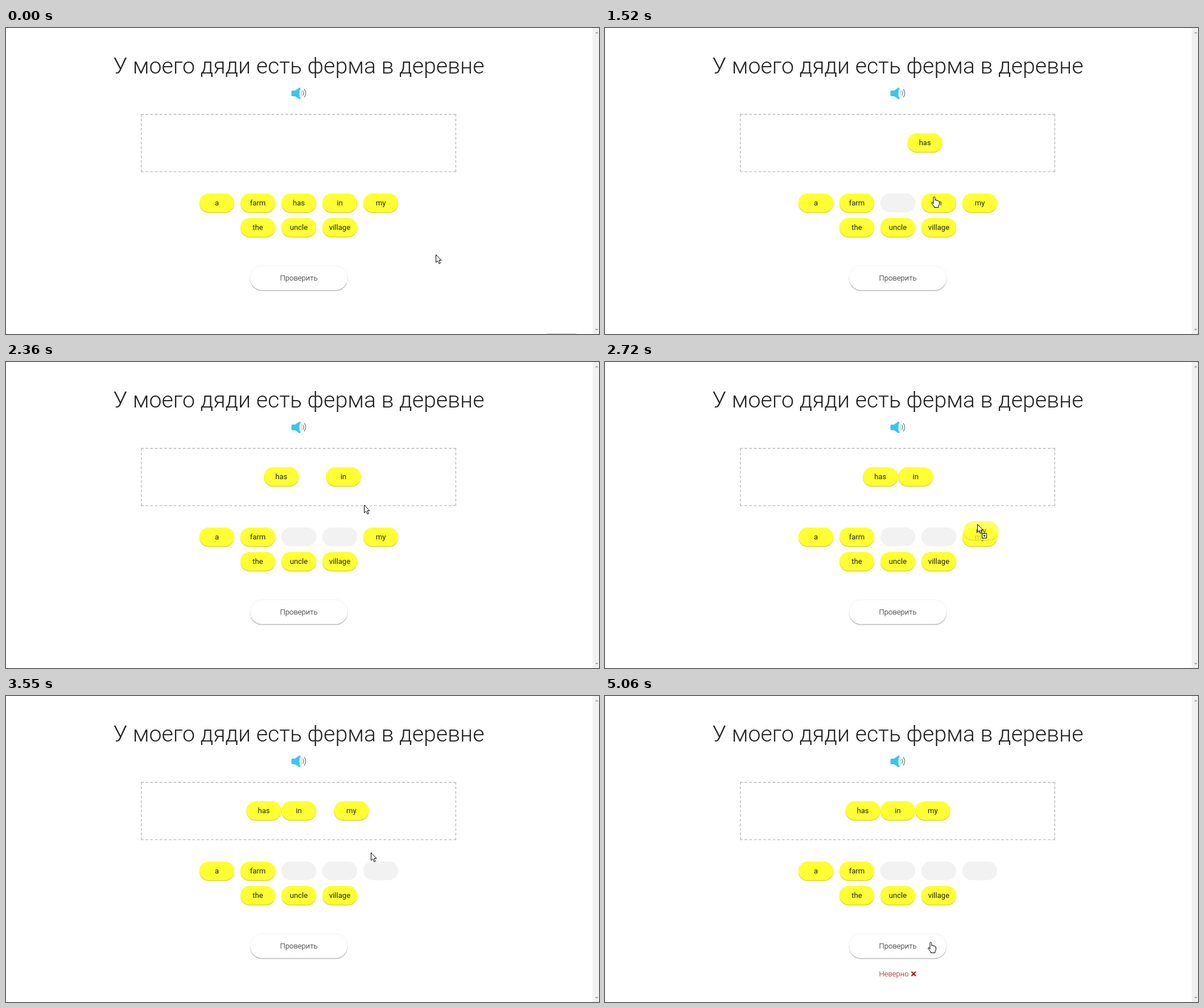
An HTML page for the animation above (6.33 s loop, 1042x538 px).

```html
<!DOCTYPE html>
<html lang="ru">
<head>
<meta charset="utf-8">
<title>Sentence builder</title>
<style>
  html, body { margin: 0; width: 100%; height: 100%; overflow: hidden; background: #fff; }
  svg { display: block; position: relative; }
  text { font: 13.1px Roboto, sans-serif; text-anchor: middle; fill: #212121; }
  .light { font-weight: 300; fill: #111; }
  .title { font-size: 39.3px; fill: #212121; }
  .outline { fill: #fff; stroke: #000; stroke-linejoin: round; }
  #zone {
    position: absolute; left: 237.400px; top: 150.800px; width: 677px; height: 125px;
    box-sizing: border-box; border: 2px dashed #c4c4c4;
    transform: scale(.8185); transform-origin: 0 0;
  }
</style>
</head>
<body>
<div id="zone"></div>
<svg width="1042" height="538" viewBox="0 0 1042 538">
  <text class="light title" x="514.5" y="80">У моего дяди есть ферма в деревне</text>

  <g fill="none" stroke="#8a8a8a" stroke-width="1.4">
    <path d="M503.500 110H508L516 104.500Q519.500 108 519.500 115T516 125.500L508 120H503.500Q501.500 120 501.500 118V112Q501.500 110 503.500 110Z" fill="#3bc4ef" stroke="none"/>
    <ellipse cx="517.200" cy="115" rx="1.600" ry="7.500" fill="#fff" stroke="none"/>
    <path d="M521.500 110.500Q524.500 114.800 521.500 119M524 107.500Q529.500 114.800 524 122"/>
  </g>

  <g id="board"></g>

  <rect id="buttonShadow" x="428.500" y="420" width="172" height="42.500" rx="21.200" fill="#c3c3c3"/>
  <rect x="428.800" y="418" width="171.400" height="42.500" rx="21.200" fill="#fff" stroke="#efefef" stroke-width=".8"/>
  <text class="light" x="514.500" y="444">Проверить</text>

  <g id="verdict">
    <text class="light" x="507.500" y="493" style="fill:#8e1010">Неверно</text>
    <path d="M538.500 484.700L546 492.200M546 484.700L538.500 492.200" stroke="#b01217" stroke-width="2.300"/>
  </g>

  <path id="dots" d="M951 537.500H1002" stroke="#888" stroke-dasharray="1 1"/>
  <rect x="1031" width="11" height="538" fill="#f1f1f1"/>
  <path d="M1035 9.500L1038 6.500 1041 9.500ZM1035 529L1038 532 1041 529Z" fill="#a3a3a3"/>

  <g id="drag"></g>
  <g id="cursor">
    <path id="arrow" class="outline" d="M.5 .5V14.200L3.700 11.300 6 16.500 8.200 15.500 6 10.500H10Z"/>
    <path id="hand" class="outline" d="M-2 12V1.500Q-2 0 -.5 0T1 1.500V6Q1.500 5 3 5.400T4 7Q5 6 6.300 6.600T7 8Q8 7.300 8.500 9V13L7 16V18.500H-.5V17L-5 11.500Q-5.500 9 -3.500 9.500Z"/>
    <g id="plus">
      <rect class="outline" x="8.500" y="16.500" width="8" height="8"/>
      <path d="M12.500 18.500V22.500M10.500 20.500H14.500" stroke="#000"/>
    </g>
  </g>
</svg>
<script>
const LOOP = 6330, STEP = 60, CHIP_W = 61.4, CHIP_H = 32.7, CENTER = 514.5;
const $ = id => document.getElementById(id);
const clamp = v => Math.max(0, Math.min(1, v));

function add(parent, tag, attrs) {
  const node = document.createElementNS('http://www.w3.org/2000/svg', tag);
  for (const name in attrs) node.setAttribute(name, attrs[name]);
  return parent.appendChild(node);
}
const place = (node, x, y) => node.setAttribute('transform', `translate(${x} ${y})`);
const show = (node, visible) => node.setAttribute('opacity', +visible);

function pill(parent, fill, y = 0) {
  return add(parent, 'rect', { y, width: CHIP_W, height: CHIP_H, rx: CHIP_H / 2, fill });
}
function makeChip(parent, word) {
  const chip = add(parent, 'g');
  pill(chip, '#d8d43c', 1.6);
  pill(chip, '#ffff33');
  add(chip, 'text', { x: CHIP_W / 2, y: 21 }).textContent = word;
  return chip;
}

// Drags: pick-up time, drop time and the pointer's grip inside the chip.
const drags = {
  has: { from: 990, drop: 1280, grip: [42, 12] },
  in: { from: 1700, drop: 2120, grip: [26, 7] },
  my: { from: 2660, drop: 3250, grip: [24, 5] }
};
const rows = [['a', 'farm', 'has', 'in', 'my'], ['the', 'uncle', 'village']];
const chips = rows.flatMap((row, r) => row.map((word, i) => {
  const x = CENTER - CHIP_W / 2 + 72 * (i - (row.length - 1) / 2);
  const y = 291 + 43 * r;
  place(pill($('board'), '#f2f2f2'), x, y);
  return { word, x, y, drag: drags[word] };
}));
for (const chip of chips) {
  chip.node = makeChip($('board'), chip.word);
  if (chip.drag) chip.ghost = makeChip($('drag'), chip.word);
}
const movers = chips.filter(chip => chip.drag);

// Pointer path: time, x, y.
const path = [
  [270, 755, 398], [450, 732, 390], [750, 565, 330], [870, 529, 315], [930, 526, 303],
  [990, 512, 268], [1050, 504, 247], [1110, 500, 234], [1220, 500, 234],
  [1520, 579, 297], [1640, 582, 298], [1700, 582, 298], [2060, 600, 215], [2120, 602, 216],
  [2360, 629, 251], [2540, 650, 293], [2660, 652, 295], [3140, 669, 215], [3190, 669, 215],
  [3550, 641, 275], [3850, 596, 405], [4270, 573, 433]
];
function pointerAt(t) {
  const next = path.findIndex(key => key[0] > t);
  if (next < 1) return path.at(next).slice(1);
  const [t0, x0, y0] = path[next - 1], [t1, x1, y1] = path[next];
  const k = (t - t0) / (t1 - t0);
  return [x0 + (x1 - x0) * k, y0 + (y1 - y0) * k];
}

// Same curve as the CSS "ease" timing function.
function ease(x) {
  if (x <= 0 || x >= 1) return clamp(x);
  let lo = 0, hi = 1, s;
  for (let i = 0; i < 20; i++) {
    s = (lo + hi) / 2;
    if (.75 * s * (1 - s) + s ** 3 < x) lo = s; else hi = s;
  }
  return .3 * s * (1 - s) ** 2 + 3 * s * s * (1 - s) + s ** 3;
}

const restarts = [0, 330, 1280, 3250, 4710, 4940];
function snap(t) {
  const start = restarts.findLast(s => s <= t);
  return start + Math.floor((t - start) / STEP) * STEP;
}

function render(t) {
  const [px, py] = pointerAt(t);
  const inside = (x, y, w, h) => px >= x && px <= x + w && py >= y && py <= y + h;
  const dropped = movers.filter(chip => t >= chip.drag.drop).length;
  let dragging = false, hover = inside(429, 418, 171, 44);

  for (const chip of chips) {
    let { x, y, drag } = chip, opacity = 1;
    if (drag) {
      const age = t - drag.drop;
      const held = t >= drag.from && age < 0;
      if (age >= 0) {
        x = CENTER + CHIP_W * (movers.indexOf(chip) - dropped / 2) + 100 * (1 - ease((age - 57) / 600));
        y = 185;
        opacity = clamp((age - 100) / 100);
      }
      place(chip.ghost, px - drag.grip[0], py - drag.grip[1]);
      show(chip.ghost, held * .75);
      dragging ||= held;
    }
    place(chip.node, x, y);
    show(chip.node, opacity);
    hover ||= inside(x, y, CHIP_W, CHIP_H + 2);
  }

  place($('cursor'), px, py);
  show($('hand'), hover && !dragging);
  show($('arrow'), !hover || dragging);
  show($('plus'), dragging);
  show($('dots'), t < 330);
  $('buttonShadow').setAttribute('y', t >= 4710 && t < 4940 ? 419 : 420);
  show($('verdict'), clamp((t - 4880) / 180) * (t >= 4940));
}

const origin = performance.now();
function frame() {
  render(snap((performance.now() - origin) % LOOP));
  requestAnimationFrame(frame);
}
frame();
</script>
</body>
</html>
```
